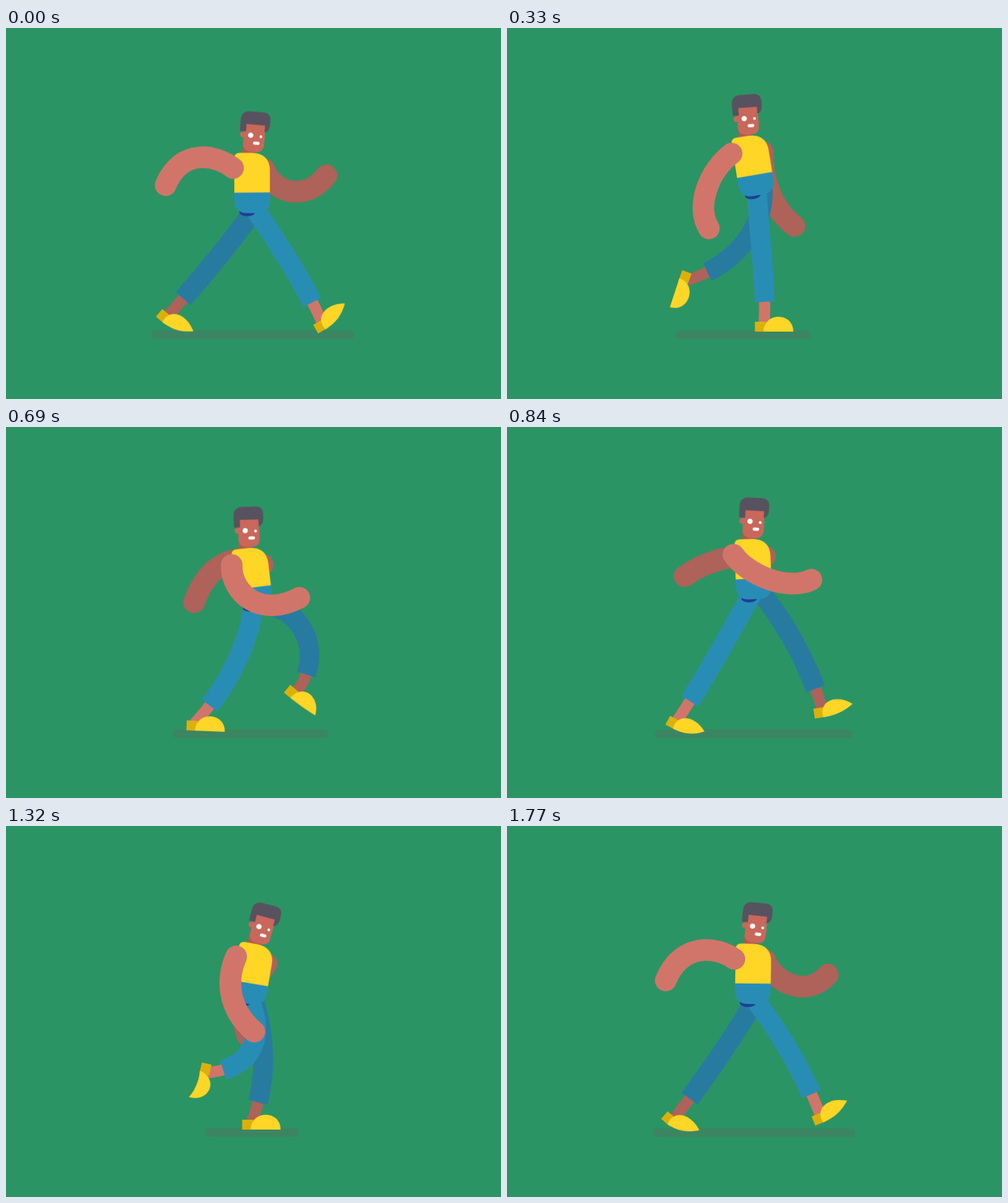
Write an HTML page without scripts that moves like this. It is 800x600 px and loops after 1.8 s.

```html
<!DOCTYPE html>
<html lang="en">
<head>
<meta charset="utf-8">
<title>Walk cycle</title>
<style>
html, body { margin: 0; width: 100%; height: 100%; overflow: hidden; background: #2b9464; }
svg { display: block; width: 100vw; height: 100vh; }

:root { --sine: cubic-bezier(.364, 0, .636, 1); }

/* body rhythm: two bounces per step, one lean per stride */
.bob { animation: bob .225s var(--sine) -.1125s infinite alternate; }
.lean { transform-origin: 398px 250px; animation: lean .9s var(--sine) -.45s infinite alternate; }
.sway { transform-origin: 0 475px; animation: sway .9s var(--sine) -.45s infinite alternate; }
@keyframes bob { from { transform: translateY(-28px); } to { transform: translateY(28px); } }
@keyframes lean { from { transform: rotate(10deg); } to { transform: rotate(-10deg); } }
@keyframes sway { from { transform: skewX(2deg); } to { transform: skewX(-2deg); } }

.arm { fill: none; stroke-width: 35; stroke-linecap: round; }
.leg { fill: none; stroke-width: 18; animation: leg 1.8s linear infinite; }
.pants { stroke-width: 32; stroke-dasharray: 83 100; }
.foot { animation: foot 1.8s linear infinite; }
.toe { animation: toe 1.8s linear infinite; }
.far .leg, .far .foot, .far .toe { animation-delay: -.9s; }
.near-arm { animation: near-arm 1.8s linear infinite; }
.far-arm { animation: far-arm 1.8s linear infinite; }
.shadow { animation: shadow .9s linear infinite; }

.skin { stroke: #d1756a; }
.skin-far { stroke: #ae6259; }
.blue { stroke: #288db5; }
.blue-far { stroke: #277ba0; }

@keyframes leg {
  0%, 100% { d: path("M397 285C435 340 482 410 512 478"); }
  4.167% { d: path("M397 309C435 355 470 415 488 481"); }
  8.333% { d: path("M397 309C444 340 478 405 466 481"); }
  13.333% { d: path("M397 279C428 340 442 405 440 481"); }
  18.333% { d: path("M397 257C400 325 418 405 416 481"); }
  23.333% { d: path("M397 274C415 340 418 405 388 481"); }
  31.667% { d: path("M397 313C412 365 404 430 336 478"); }
  40% { d: path("M397 268C388 340 350 415 296 481"); }
  46.667% { d: path("M397 264C362 330 315 415 273 479"); }
  50% { d: path("M397 285C365 335 310 400 251 468"); }
  54.167% { d: path("M397 309C375 365 335 415 254 457"); }
  58.333% { d: path("M397 309C390 365 345 430 267 443"); }
  63.333% { d: path("M397 279C400 355 345 402 269 424"); }
  68.333% { d: path("M397 257C405 320 355 385 279 408"); }
  73.333% { d: path("M397 274C425 335 405 395 323 399"); }
  81.667% { d: path("M397 313C478 290 528 392 400 403"); }
  89.167% { d: path("M397 284C470 290 500 370 466 432"); }
  96.667% { d: path("M397 264C440 315 482 390 501 459"); }
}

@keyframes foot {
  0%, 100% { transform: translate(517px, 487px) rotate(-30deg); }
  4.167% { transform: translate(488px, 491px) rotate(0deg); }
  8.333% { transform: translate(464px, 491px) rotate(0deg); }
  18.333% { transform: translate(415px, 491px) rotate(0deg); }
  23.333% { transform: translate(387px, 491px) rotate(0deg); }
  31.667% { transform: translate(341px, 491px) rotate(0deg); }
  40% { transform: translate(297px, 491px) rotate(3deg); }
  46.667% { transform: translate(269px, 488px) rotate(28deg); }
  48.333% { transform: translate(251px, 483px) rotate(41deg); }
  50% { transform: translate(244px, 476px) rotate(40deg); }
  54.167% { transform: translate(245px, 461px) rotate(65deg); }
  58.333% { transform: translate(257px, 443px) rotate(90deg); }
  63.333% { transform: translate(259px, 422px) rotate(104deg); }
  68.333% { transform: translate(269px, 405px) rotate(110deg); }
  73.333% { transform: translate(313px, 396px) rotate(103deg); }
  81.667% { transform: translate(390px, 407px) rotate(80deg); }
  89.167% { transform: translate(458px, 442px) rotate(35deg); }
  96.667% { transform: translate(502px, 469px) rotate(-8deg); }
  98.333% { transform: translate(511px, 479px) rotate(-22deg); }
}

/* the front of the shoe bends against the heel */
@keyframes toe {
  0%, 50%, 100% { transform: rotate(-24deg); d: path("M0 0C2 -22 30 -28 52 0Q26 11 0 0Z"); }
  4.167%, 40% { transform: rotate(0deg); d: path("M0 0C0 -32 48 -32 48 0Q24 0 0 0Z"); }
  46.667% { transform: rotate(-23deg); d: path("M0 0C2 -22 30 -28 51 0Q26 11 0 0Z"); }
  48.333% { transform: rotate(-31deg); d: path("M0 0C2 -22 30 -28 52 0Q26 11 0 0Z"); }
  58.333% { transform: rotate(-18deg); d: path("M0 0C1 -24 36 -30 49 0Q24 6 0 0Z"); }
  68.333% { transform: rotate(-2deg); d: path("M0 0C0 -32 49 -32 49 0Q24 0 0 0Z"); }
  73.333% { transform: rotate(10deg); d: path("M0 0C0 -34 42 -34 46 0Q24 -7 0 0Z"); }
  81.667% { transform: rotate(5deg); d: path("M0 0C0 -34 42 -34 46 0Q24 -4 0 0Z"); }
  96.667% { transform: rotate(-16deg); d: path("M0 0C2 -24 32 -29 52 0Q26 8 0 0Z"); }
}

@keyframes near-arm {
  0%, 100% { d: path("M367 226C340 205 284 192 258 254"); }
  4.167% { d: path("M366 227C336 205 285 188 256 231"); }
  8.333% { d: path("M365 228C335 208 285 205 259 239"); }
  13.333% { d: path("M364 230C325 215 292 240 284 300"); }
  18.333% { d: path("M363 231C324 261 305 318 326 352"); }
  23.333% { d: path("M363 231C325 262 325 318 355 349"); }
  31.667% { d: path("M363 231C350 284 389 320 440 286"); }
  39.167% { d: path("M365 229C365 275 415 315 478 282"); }
  46.667% { d: path("M366 227C390 261 455 286 492 268"); }
  50% { d: path("M367 226C390 264 450 284 490 238"); }
  54.167% { d: path("M368 225C388 268 448 278 492 227"); }
  58.333% { d: path("M369 224C398 262 450 273 492 247"); }
  63.333% { d: path("M370 223C378 280 430 300 473 303"); }
  68.333% { d: path("M371 222C364 275 395 315 437 348"); }
  73.333% { d: path("M372 222C357 256 356 305 402 344"); }
  81.667% { d: path("M371 222C345 225 305 250 311 296"); }
  89.167% { d: path("M369 224C335 205 285 225 272 289"); }
  96.667% { d: path("M368 226C338 207 280 205 255 268"); }
}

@keyframes far-arm {
  0%, 100% { d: path("M417 228C434 269 486 280 518 238"); }
  4.167% { d: path("M416 228C436 268 488 270 519 228"); }
  8.333% { d: path("M415 228C445 266 480 272 520 247"); }
  13.333% { d: path("M414 228C425 278 466 295 501 303"); }
  18.333% { d: path("M413 228C412 278 432 323 465 348"); }
  23.333% { d: path("M413 228C404 270 400 315 430 344"); }
  31.667% { d: path("M414 228C380 222 338 250 339 296"); }
  39.167% { d: path("M415 229C370 205 325 225 300 289"); }
  46.667% { d: path("M417 230C375 226 330 232 287 262"); }
  50% { d: path("M417 228C375 212 320 215 286 254"); }
  54.167% { d: path("M418 228C375 205 320 205 284 231"); }
  58.333% { d: path("M419 228C380 218 330 216 287 239"); }
  63.333% { d: path("M420 230C370 225 322 245 312 300"); }
  68.333% { d: path("M421 232C372 262 345 305 354 352"); }
  73.333% { d: path("M421 234C395 270 375 310 389 349"); }
  81.667% { d: path("M420 231C405 284 425 318 468 287"); }
  89.167% { d: path("M419 230C415 275 460 312 506 282"); }
  96.667% { d: path("M418 229C432 265 488 298 519 266"); }
}

@keyframes shadow {
  0%, 100% { x: 235px; width: 328px; }
  16.667% { x: 238px; width: 303px; }
  26.667% { x: 248px; width: 268px; }
  36.667% { x: 271px; width: 220px; }
  46.667% { x: 322px; width: 151px; }
  53.333% { x: 326px; width: 146px; }
  63.333% { x: 318px; width: 163px; }
  78.333% { x: 263px; width: 263px; }
  93.333% { x: 239px; width: 320px; }
  96.667% { x: 236px; width: 327px; }
}
</style>
</head>
<body>
<svg viewBox="0 0 800 600">
  <rect width="800" height="600" fill="#2b9464"/>
  <rect class="shadow" x="235" y="489" width="328" height="14" rx="7" fill="#3c8563"/>

  <g class="bob"><path class="arm far-arm skin-far" d="M417 228C434 269 486 280 518 238"/></g>

  <g class="far" transform="translate(9)">
    <g class="sway">
      <path class="leg skin-far" d="M397 285C365 335 310 400 251 468"/>
      <path class="leg pants blue-far" pathLength="100" d="M397 285C365 335 310 400 251 468"/>
    </g>
    <g class="foot">
      <path d="M-14 -16H4V0H-14Z" fill="#dcb00b"/>
      <path class="toe" d="M0 0C0 -32 48 -32 48 0Q24 0 0 0Z" fill="#ffd526"/>
    </g>
  </g>

  <g class="near">
    <g class="sway">
      <path class="leg skin" d="M397 285C435 340 482 410 512 478"/>
      <path class="leg pants blue" pathLength="100" d="M397 285C435 340 482 410 512 478"/>
    </g>
    <g class="foot">
      <path d="M-14 -16H4V0H-14Z" fill="#dcb00b"/>
      <path class="toe" d="M0 0C0 -32 48 -32 48 0Q24 0 0 0Z" fill="#ffd526"/>
    </g>
  </g>

  <g class="bob">
    <g class="lean">
      <g transform="translate(400 200) rotate(5)">
        <path d="M-18 -14H4V8H-18Z" fill="#ad5a50"/>
        <path d="M-18 -46H16V-13Q16 0 3 0H-4Q-18 0 -18 -13Z" fill="#c9675b"/>
        <rect x="-24" y="-31" width="12" height="9" rx="4.5" fill="#c9675b"/>
        <path d="M-25 -32V-50Q-25 -65 -10 -65H10Q23 -65 23 -52V-46Q23 -35 15 -33V-44H-15V-32Z" fill="#57525f"/>
        <g fill="#fff">
          <circle cx="-6.8" cy="-26.5" r="4.3"/>
          <circle cx="9.8" cy="-25.5" r="2.3"/>
          <rect x="-2" y="-16.8" width="10.6" height="5" rx="2.5"/>
        </g>
      </g>
      <ellipse cx="390" cy="297" rx="13" ry="7" fill="#1f3d96"/>
      <path d="M369 264H426.500V277Q426.500 299 405 299H390Q369 299 369 277Z" fill="#288db5"/>
      <path d="M369 266V210Q369 201.500 378 201.500H398Q426.500 203 426.500 230V265.500Z" fill="#ffd526"/>
    </g>
    <path class="arm near-arm skin" d="M367 226C340 205 284 192 258 254"/>
  </g>
</svg>
</body>
</html>
```
